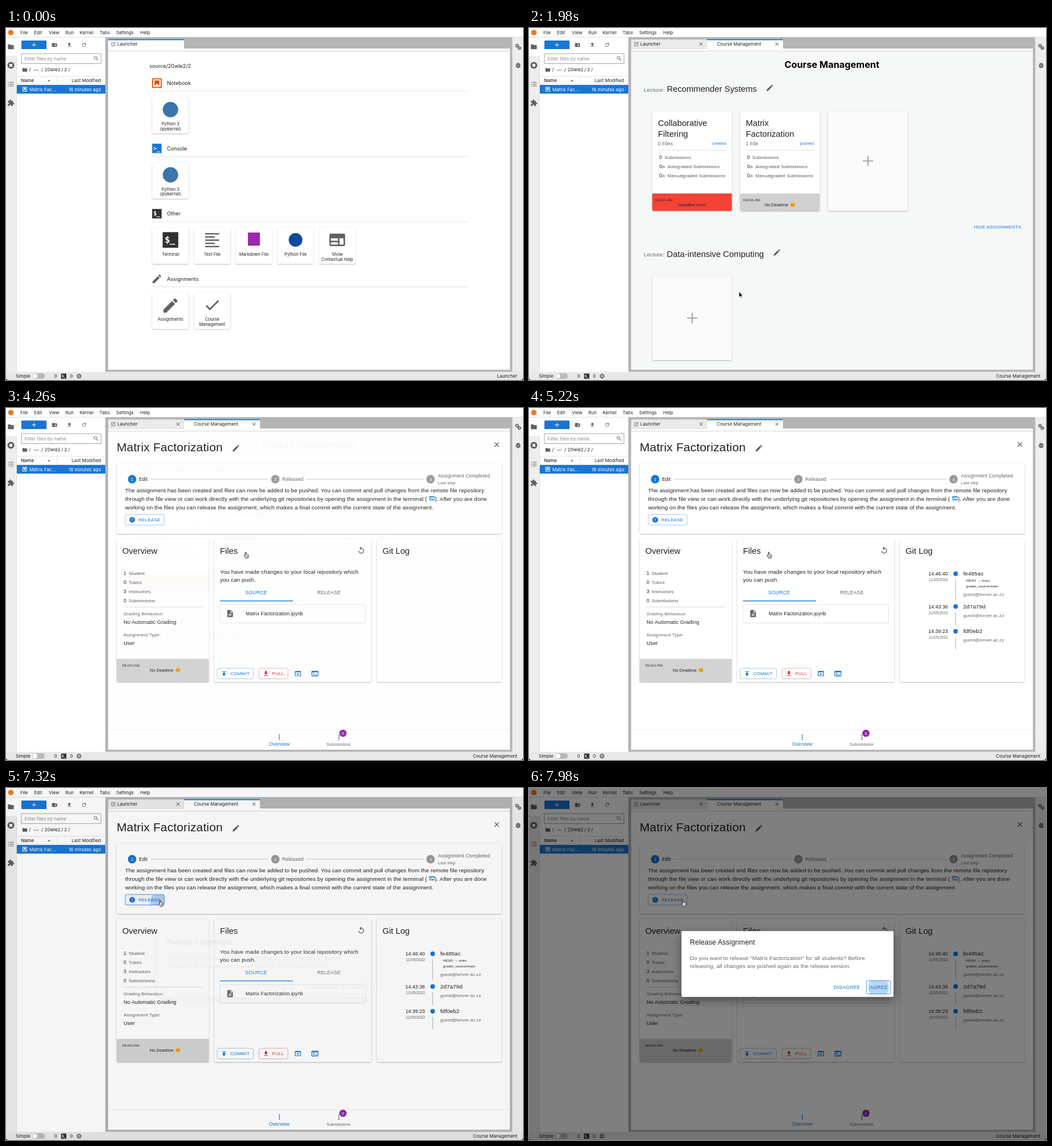
Write an HTML page that moves like this. It is 906 by 618 pixels and loops after 8000 ms.

```html
<!DOCTYPE html>
<html lang="en">
<head>
<meta charset="utf-8">
<title>Course Management</title>
<style>
html,body{margin:0;width:100%;height:100%;overflow:hidden;background:#fff}
svg{display:block;width:906px;height:618px}
.s{font-family:Inter,"Noto Sans",sans-serif}
.h{font-family:"Liberation Sans",Arial,sans-serif}
.m{font-family:"DejaVu Sans Mono",monospace;font-weight:bold}
</style>
</head>
<body>
<svg id="stage" viewBox="0 0 906 618" xmlns="http://www.w3.org/2000/svg"></svg>
<script>
const LOOP = 8000;
const BLUE = '#1976d2', DARK = '#1f1f1f', GREY = '#666', ICON = '#616161', EDGE = '#b5b5b5';

const ICONS = {
  pencil: 'M3 17.25V21h3.75L17.81 9.94l-3.75-3.75L3 17.25zM20.71 7.04c.39-.39.39-1.02 0-1.41l-2.34-2.34c-.39-.39-1.02-.39-1.41 0l-1.83 1.83 3.75 3.75 1.83-1.83z',
  close: 'M19 6.41 17.59 5 12 10.59 6.41 5 5 6.41 10.59 12 5 17.59 6.41 19 12 13.41 17.59 19 19 17.59 13.41 12z',
  folder: 'M10 4H4c-1.1 0-2 .9-2 2v12c0 1.1.9 2 2 2h16c1.1 0 2-.9 2-2V8c0-1.1-.9-2-2-2h-8l-2-2z',
  addFolder: 'M20 6h-8l-2-2H4c-1.1 0-2 .9-2 2v12c0 1.1.9 2 2 2h16c1.1 0 2-.9 2-2V8c0-1.1-.9-2-2-2zm-1 8h-3v3h-2v-3h-3v-2h3V9h2v3h3v2z',
  upload: 'M9 16h6v-6h4l-7-7-7 7h4zm-4 2h14v2H5z',
  refresh: 'M17.65 6.35C16.2 4.9 14.21 4 12 4c-4.42 0-8 3.58-8 8s3.58 8 8 8c3.73 0 6.84-2.55 7.73-6h-2.08c-.82 2.33-3.04 4-5.65 4-3.31 0-6-2.69-6-6s2.69-6 6-6c1.66 0 3.14.69 4.22 1.78L13 11h7V4z',
  search: 'M15.5 14h-.79l-.28-.27C15.41 12.59 16 11.11 16 9.5 16 5.91 13.09 3 9.5 3S3 5.91 3 9.5 5.91 16 9.5 16c1.61 0 3.09-.59 4.23-1.57l.27.28v.79l5 4.99L20.49 19zm-6 0C7.01 14 5 11.99 5 9.5S7.01 5 9.5 5 14 7.01 14 9.5 11.99 14 9.5 14z',
  puzzle: 'M20.5 11H19V7c0-1.1-.9-2-2-2h-4V3.5C13 2.12 11.88 1 10.5 1S8 2.12 8 3.5V5H4c-1.1 0-2 .9-2 2v3.8h1.5c1.49 0 2.7 1.21 2.7 2.7s-1.21 2.7-2.7 2.7H2V20c0 1.1.9 2 2 2h3.8v-1.5c0-1.49 1.21-2.7 2.7-2.7s2.7 1.21 2.7 2.7V22H17c1.1 0 2-.9 2-2v-4h1.5c1.38 0 2.5-1.12 2.5-2.5S21.88 11 20.5 11z',
  bug: 'M20 8h-2.81c-.45-.78-1.07-1.45-1.82-1.96L17 4.41 15.59 3l-2.17 2.17a6 6 0 0 0-2.83 0L8.41 3 7 4.41l1.62 1.63C7.88 6.55 7.26 7.22 6.81 8H4v2h2.09L6 11v1H4v2h2v1l.09 1H4v2h2.81a6 6 0 0 0 10.38 0H20v-2h-2.09l.09-1v-1h2v-2h-2v-1l-.09-1H20zm-6 8h-4v-2h4zm0-4h-4v-2h4z',
  check: 'M9 16.17 4.83 12l-1.42 1.41L9 19 21 7l-1.41-1.41z',
  list: 'M3 5h2.5v2.5H3zM8 5h13v2H8zM3 11h2.5v2.5H3zM8 11h13v2H8zM3 17h2.5v2.5H3zM8 17h13v2H8z',
  popOut: 'M19 19H5V5h7V3H5a2 2 0 0 0-2 2v14c0 1.1.9 2 2 2h14c1.1 0 2-.9 2-2v-7h-2zM14 3v2h3.59l-9.83 9.83 1.41 1.41L19 6.41V10h2V3z',
  push: 'M5 4v2h14V4zm0 10h4v6h6v-6h4l-7-7z',
  pull: 'M19 9h-4V3H9v6H5l7 7zM5 18v2h14v-2z',
  browser: 'M19 4H5a2 2 0 0 0-2 2v12c0 1.1.89 2 2 2h4v-2H5V8h14v10h-4v2h4c1.1 0 2-.9 2-2V6a2 2 0 0 0-2-2zm-7 6-4 4h3v6h2v-6h3z',
  shell: 'M20 4H4a2 2 0 0 0-2 2v12c0 1.1.89 2 2 2h16c1.1 0 2-.9 2-2V6a2 2 0 0 0-2-2zm0 14H4V8h16zm-2-1h-6v-2h6zM7.5 17l-1.41-1.41L8.67 13l-2.59-2.59L7.5 9l4 4z',
  file: 'M14 2H6a2 2 0 0 0-2 2v16c0 1.1.89 2 2 2h12c1.1 0 2-.9 2-2V8zM16 18H8v-2h8zm0-4H8v-2h8zm-3-5V3.5L18.5 9z',
  badge: 'M23 12l-2.44-2.78.34-3.68-3.61-.82-1.89-3.18L12 3 8.6 1.54 6.71 4.72l-3.61.81.34 3.68L1 12l2.44 2.78-.34 3.69 3.61.82 1.89 3.18L12 21l3.4 1.46 1.89-3.18 3.61-.82-.34-3.68zm-10 5h-2v-2h2zm0-4h-2V7h2z',
  replay: 'M12 5V1L7 6l5 5V7c3.31 0 6 2.69 6 6s-2.69 6-6 6-6-2.69-6-6H4c0 4.42 3.58 8 8 8s8-3.58 8-8-3.58-8-8-8z',
  dots: 'M12 8a2 2 0 1 0 0-4 2 2 0 0 0 0 4zm0 2a2 2 0 1 0 0 4 2 2 0 0 0 0-4zm0 6a2 2 0 1 0 0 4 2 2 0 0 0 0-4z',
  panel: 'M20 4H4a2 2 0 0 0-2 2v12c0 1.1.9 2 2 2h16c1.1 0 2-.9 2-2V6a2 2 0 0 0-2-2zM4 10h9v3H4zm0 5h9v3H4zm11-5h5v8h-5z'
};

// drawing helpers: each returns markup
const rect = (x, y, x2, y2, fill, more = '') =>
  `<rect x="${x}" y="${y}" width="${x2 - x}" height="${y2 - y}" fill="${fill}" ${more}/>`;
const disc = (x, y, r, fill, more = '') => `<circle cx="${x}" cy="${y}" r="${r}" fill="${fill}" ${more}/>`;
const path = (d, stroke, w = 1, fill = 'none') =>
  `<path d="${d}" fill="${fill}" stroke="${stroke}" stroke-width="${w}"/>`;
const icon = (name, x, y, size, fill = ICON) =>
  `<path transform="translate(${x - size / 2} ${y - size / 2}) scale(${size / 24})" d="${ICONS[name]}" fill="${fill}" fill-rule="evenodd"/>`;
const text = (cls, x, y, str, size, fill, anchor, ls, more = '') =>
  `<text class="${cls}" x="${x}" y="${y}" font-size="${size}" fill="${fill}" text-anchor="${anchor}" letter-spacing="${ls}em" ${more}>${str}</text>`;
const ui = (x, y, str, size = 8, fill = DARK, anchor = 'start') => text('s', x, y, str, size, fill, anchor, 0);
const mat = (x, y, str, size = 8.63, fill = DARK, ls = .0107, anchor = 'start') => text('h', x, y, str, size, fill, anchor, ls);
const button = (x, y, str, size = 8.01, fill = BLUE, anchor = 'start') => mat(x, y, str, size, fill, .0286, anchor);
const group = (id, body) => `<g id="${id}">${body}</g>`;
const paper = (x, y, x2, y2, fill = '#fff') => rect(x, y, x2, y2, fill, 'rx="2.5" filter="url(#lift)"');
const outline = (x, y, x2, y2, color) => rect(x, y, x2, y2, 'none', `rx="2.5" stroke="${color}" stroke-width=".8"`);
const smile = (x, y) => disc(x, y, 4.6, '#f8bd3d') + disc(x - 1.6, y - 1, .7, '#6b4213') + disc(x + 1.6, y - 1, .7, '#6b4213') +
  disc(x - 2.8, y + .8, .9, '#f08a4b') + disc(x + 2.8, y + .8, .9, '#f08a4b') + path(`M${x - 2} ${y + 1.2}q2 2 4 0`, '#6b4213', .7);
const gear = (x, y, r) => disc(x, y, r, 'none', `stroke="${ICON}" stroke-width="1.5"`) +
  disc(x, y, r + 1, 'none', `stroke="${ICON}" stroke-width="1" stroke-dasharray="${(r + 1) * Math.PI / 8}"`);
const prompt = (x, y, size, str, half, fill) =>
  rect(x - half, y - half, x + half, y + half, fill) + text('m', x - half * .75, y + size * .32, str, size, '#fff', 'start', -.05);

function shell() {
  let s = rect(0, 0, 906, 618, '#fff') + rect(0, 16, 19, 604, '#ededed') + rect(887, 16, 906, 604, '#ededed') +
    rect(0, 17, 19, 49, '#fff') + rect(174, 16, 887, 604, EDGE) + rect(0, 603.5, 906, 618, '#e8e8e8') +
    path('M0 16.2H906M18.8 49V604M887.3 16V604', '#c9c9c9', .6) + disc(8.5, 8, 4.8, '#f37726');
  const menu = { File: 25, Edit: 49, View: 75, Run: 104, Kernel: 129, Tabs: 164, Settings: 193, Help: 235 };
  for (const k in menu) s += ui(menu[k], 11, k);
  s += icon('folder', 8.5, 33, 12.5) + icon('list', 8.5, 98.5, 13) + icon('puzzle', 8.5, 131.5, 13) +
    disc(8.5, 65.5, 6, ICON) + rect(6.1, 63.1, 10.9, 67.9, '#fff', 'rx=".6"') +
    gear(895.5, 31, 2) + gear(899.6, 35.2, 1.9) + icon('bug', 897.5, 65.5, 12.5);
  // file browser
  s += rect(19, 17, 174, 603.5, '#fff') + rect(27, 22, 71, 37, BLUE, 'rx="1"') + path('M45.5 29.6h7M49 26.1v7', '#fff', 1) +
    icon('addFolder', 85, 29.7, 10.5) + icon('upload', 111, 29.5, 10.5) + icon('refresh', 137, 29.7, 10) +
    rect(27, 45, 166.5, 62.5, '#fff', 'stroke="#9a9a9a" stroke-width=".9"') + ui(32.5, 57, 'Filter files by name', 8.2, '#8a8a8a') +
    icon('search', 158, 53.5, 11) + icon('folder', 33, 73.5, 10) + ui(40.5, 76.4, '/') +
    disc(50, 74, .8, DARK) + disc(53, 74, .8, DARK) + disc(56, 74, .8, DARK) +
    ui(62, 76.4, '/') + ui(67.5, 76.4, '20wle2') + ui(97, 76.4, '/') + ui(102, 76.4, '2') + ui(109, 76.4, '/') +
    path('M19 84.8H174M19 99.8H174M89.5 85V100', '#dcdcdc', .8) +
    text('s', 26.5, 95.3, 'Name', 8, DARK, 'start', 0, 'font-weight="500"') + path('M72.8 93.6l2.6-2.6 2.6 2.6z', 'none', 0, ICON) +
    ui(166.5, 95.3, 'Last Modified', 8, DARK, 'end') + rect(19, 100, 174, 115.2, BLUE) +
    rect(29.3, 104, 36.2, 111, 'none', 'stroke="#fff" stroke-width="1"') + path('M31 105.2h3.5v4.4l-1.75-1.5-1.75 1.5z', 'none', 0, '#fff') +
    ui(41, 110.8, 'Matrix Fac...', 8, '#fff') + ui(166.5, 110.8, '16 minutes ago', 8, '#fff', 'end');
  // status bar
  s += ui(17, 614, 'Simple') + rect(46, 606.3, 68, 615.8, '#b9b9b9', 'rx="4.7"') + disc(50.8, 611, 4, '#fff') +
    ui(84.5, 614, '0') + prompt(101.2, 611.3, 6, '$_', 4.6, '#333') + ui(112, 614, '0') +
    gear(128, 611.2, 2.9) + disc(128, 611.2, 1, ICON);
  return s + rect(179, 36, 883, 600, '#fff') + path('M179 40.6H883', '#c4c4c4', .8);
}

function launchCard(x, y, art, label, id = '') {
  const lines = label.split('|'), cx = x + 31.7;
  return paper(x, y, x + 63.4, y + 63.4) + (id ? `<rect id="${id}" x="${x}" y="${y}" width="63.4" height="63.4" fill="#fff" filter="url(#high)"/>` : '') +
    art(cx, y + 21.5) + lines.map((l, i) => ui(cx, y + 49.4 + i * 8.6, l, 7.4, DARK, 'middle')).join('');
}

function launcher() {
  const py = (x, y) => disc(x, y, 13.5, '#3b75ab');
  const pyFile = (x, y) => disc(x, y, 12, '#0a4a9f');
  const lines = (x, y) => [0, 1, 2, 3, 4].map(i => rect(x - 12.3, y - 12 + i * 5.6, x + (i % 2 ? 4.5 : 12.3), y - 9.6 + i * 5.6, ICON)).join('');
  let s = ui(251.5, 70, 'source/20wle2/2', 9);
  ['Notebook', 'Console', 'Other', 'Assignments'].forEach((n, i) => {
    const y = 97 + i * 114.5;
    s += ui(282, y + 3.2, n, 9.15) + path(`M255 ${y + 14}H810.5`, '#dcdcdc', .8);
  });
  s += rect(257, 89.3, 272, 104.3, '#fff', 'stroke="#e65100" stroke-width="1.8"') + path('M260.3 92h8.4v9.6l-4.2-3.6-4.2 3.6z', 'none', 0, '#e65100') +
    prompt(264.4, 211.4, 10, '&gt;_', 8.2, BLUE) + prompt(264.4, 326, 10, '$_', 8.3, '#333') + icon('pencil', 264.4, 440.5, 20);
  s += launchCard(256.5, 121.7, py, 'Python 3|(ipykernel)') + launchCard(256.5, 236.2, py, 'Python 3|(ipykernel)') +
    launchCard(256.5, 350.6, (x, y) => prompt(x, y, 16, '$_', 13.7, '#333'), 'Terminal') +
    launchCard(329.6, 350.6, lines, 'Text File') +
    launchCard(402.7, 350.6, (x, y) => rect(x - 10.5, y - 13, x + 10.5, y + 10, '#9c27b0'), 'Markdown File') +
    launchCard(475.7, 350.6, pyFile, 'Python File') +
    launchCard(548.8, 350.6, (x, y) => icon('panel', x, y, 33), 'Show|Contextual Help') +
    launchCard(256.5, 464.8, (x, y) => icon('pencil', x, y + 1, 33), 'Assignments') +
    launchCard(329.6, 464.8, (x, y) => icon('check', x, y, 32), 'Course|Management', 'lift-card');
  return s + rect(179, 20, 312, 40, '#fff') + rect(179, 19.6, 312, 21.4, BLUE) +
    icon('popOut', 188, 28.3, 9) + ui(195, 31.3, 'Launcher') + ui(896, 614, 'Launcher', 8, DARK, 'end');
}

const tabs = () => rect(179, 20, 312, 36, '#ebebeb', 'stroke="#c4c4c4" stroke-width=".6"') + icon('popOut', 188, 28.3, 9) + ui(195, 31.3, 'Launcher') +
  icon('close', 301.5, 28.3, 10.5) + rect(312, 20, 445, 40, '#fff') + rect(312, 19.6, 445, 21.4, BLUE) +
  ui(329.3, 31.3, 'Course Management', 7.87) + icon('close', 434.5, 28.3, 10.5) +
  ui(896, 614, 'Course Management', 7.87, DARK, 'end') + rect(179, 41, 883, 600, '#f6f8f8') +
  text('s', 530.8, 69.8, 'Course Management', 16.3, '#000', 'middle', 0, 'font-weight="700"');

function taskCard(x, title, files, state, id) {
  let s = paper(x, 146.5, x + 139.5, 321) + (id ? `<rect id="${id}" x="${x}" y="146.5" width="139.5" height="174.5" rx="2.5" fill="#eeeeee"/>` : '');
  title.forEach((l, i) => s += mat(x + 10, 171.7 + i * 19.7, l, 14.79, DARK, 0));
  s += mat(x + 10, 205.6, files, 8.63, GREY) + mat(x + 129.5, 204.6, state, 7.4, BLUE, .012, 'end') + path(`M${x + 10} 214.3h120`, '#d6d6d6', .8);
  ['Submissions', 'Autograded Submissions', 'Manualgraded Submissions'].forEach((l, i) => {
    const y = 229.9 + i * 16.2;
    s += mat(x + 12.3, y, '0', 8.63) + (i ? mat(x + 17.2, y, '/0', 5.6) : '') + mat(x + (i ? 26.7 : 21.2), y, l, 8.05, '#555');
  });
  return s;
}
const strip = (x, x2, y, y2, fill) => `<path d="M${x} ${y}H${x2}V${y2 - 2.5}q0 2.5-2.5 2.5H${x + 2.5}q-2.5 0-2.5-2.5z" fill="${fill}"/>`;
const due = (x, y) => mat(x, y, 'DEADLINE', 5.5, DARK, .083);
const plus = (x, y) => path(`M${x - 9} ${y}h18M${x} ${y - 9}v18`, '#a3a3a3', 2);

const lectures = () => mat(201, 111.6, 'Lecture:', 9.86, GREY) + mat(241.5, 112.2, 'Recommender Systems', 14.79, DARK, 0) + icon('pencil', 422, 105, 14.8) +
  mat(201, 401, 'Lecture:', 9.86, GREY) + mat(241.5, 401.6, 'Data-intensive Computing', 14.79, DARK, 0) + icon('pencil', 434.5, 394, 14.8);

const cards = () => taskCard(216, ['Collaborative', 'Filtering'], '0 Files', 'created') + strip(216, 355.5, 290.6, 321, '#f44336') + due(221, 304) +
  mat(285.8, 313, 'Deadline over!', 7.4, DARK, .012, 'middle') +
  taskCard(370, ['Matrix', 'Factorization'], '1 File', 'pushed', 'hover-card') + strip(370, 509.5, 290.6, 321, '#d0d0d0') + due(375, 304) +
  mat(413, 313, 'No Deadline', 7.4, DARK, .012) + smile(461.8, 310) +
  paper(524, 146.5, 664, 321, '#fafafa') + plus(594, 233.5) + button(862.5, 352.4, 'HIDE ASSIGNMENTS', 8.01, BLUE, 'end') +
  paper(216, 435.5, 355.5, 583, '#fafafa') + plus(286, 509.2);

function detail() {
  let s = rect(179, 41, 883, 600, '#fff') + mat(194, 75.6, 'Matrix Factorization', 20.95, DARK, .00735) + icon('pencil', 403, 70.5, 15) +
    icon('close', 860, 64, 15) + paper(194, 97.5, 868.5, 221) +
    path('M254 125H460M526 125H732', '#bdbdbd', .8);
  [[221, BLUE], [472, '#9a9a9a'], [744, '#9a9a9a']].forEach(([x, c], i) =>
    s += disc(x, 125, 7.4, c) + mat(x, 127.7, i + 1, 7.4, '#fff', 0, 'middle'));
  s += mat(233, 128.2, 'Edit') + mat(484, 128.2, 'Released', 8.63, GREY) + mat(757, 121.8, 'Assignment Completed', 8.63, GREY) + mat(757, 133.6, 'Last step', 7.4, GREY, .012);
  s += mat(208.7, 148.4, 'The assignment has been created and files can now be added to be pushed. You can commit and pull changes from the remote file repository', 9.86, DARK, .0094) +
    mat(208.7, 163.1, 'through the file view or can work directly with the underlying git repositories by opening the assignment in the terminal (', 9.86, DARK, .0094) +
    icon('shell', 746.3, 158.6, 11, BLUE) + mat(751.5, 163.1, '). After you are done', 9.86, DARK, .0094) +
    mat(208.7, 177.7, 'working on the files you can release the assignment, which makes a final commit with the current state of the assignment.', 9.86, DARK, .0094);
  s += '<rect id="rel" x="209" y="187" width="68.3" height="18.5" rx="2.5" stroke-width=".8"/>' +
    '<g clip-path="url(#relClip)"><circle id="wave" cx="270" cy="199" fill="#1976d2"/></g>' +
    icon('badge', 221.2, 196.3, 12, BLUE) + button(232, 199.2, 'RELEASE');
  // overview
  s += paper(194, 230, 355.5, 481) + mat(203.7, 255.5, 'Overview', 14.79, DARK, 0);
  ['Student', 'Tutors', 'Instructors', 'Submissions'].forEach((l, i) =>
    s += mat(206, 292.8 + i * 16.1, [1, 0, 3, 0][i], 8.63) + mat(215, 292.6 + i * 16.1, l, 8.01, '#555'));
  s += path('M204 349.5H345.5', '#d6d6d6', .8) + mat(206, 363.8, 'Grading Behaviour:', 8.01, GREY) + mat(206, 378.5, 'No Automatic Grading', 9.25) +
    mat(206, 400.8, 'Assignment Type:', 8.01, GREY) + mat(206, 415.8, 'User', 9.25) +
    strip(194, 355.5, 440.5, 481, '#d3d3d3') + due(203.7, 453.8) + mat(252, 463, 'No Deadline', 7.4, DARK, .012) + smile(301.2, 460);
  // files
  s += paper(365, 230, 640, 481) + mat(375, 255.5, 'Files', 14.79, DARK, 0) + icon('replay', 622.5, 250, 14.8) +
    mat(375, 290.6, 'You have made changes to your local repository which', 9.86, DARK, .0094) + mat(375, 305.4, 'you can push.', 9.86, DARK, .0094) +
    button(438.5, 327.3, 'SOURCE', 8.63, BLUE, 'middle') + button(566, 327.3, 'RELEASE', 8.63, GREY, 'middle') + rect(375, 338, 503, 339.4, BLUE) +
    outline(375, 345, 630, 377.5, '#dcdcdc') + icon('file', 392.7, 361, 14.8) + mat(420, 364.2, 'Matrix Factorization.ipynb', 8.63) +
    outline(370, 457, 433.5, 475.5, '#8cbae8') + icon('push', 382, 466.2, 12, BLUE) + button(393, 469.2, 'COMMIT') +
    outline(443.5, 457, 494, 475.5, '#e99797') + icon('pull', 455.5, 466.2, 12, '#d32f2f') + button(466.5, 469.2, 'PULL', 8.01, '#d32f2f') +
    icon('browser', 511.5, 466.3, 14, BLUE) + icon('shell', 541.3, 466.3, 14.5, BLUE);
  s += paper(650, 230, 868.5, 481) + mat(659.7, 255.5, 'Git Log', 14.79, DARK, 0) + group('log', gitLog());
  s += rect(179, 564.5, 883, 600, '#fff') + path('M179 564.7H883', '#ececec', .8) + icon('dots', 479, 577.8, 14, BLUE) +
    mat(478.8, 593, 'Overview', 8.63, BLUE, 0, 'middle') + icon('dots', 583.3, 578.2, 14) + mat(582.8, 593, 'Submissions', 7.4, GREY, .002, 'middle') +
    disc(590.5, 571, 6.3, '#8e24aa') + mat(590.5, 573.6, '0', 7.2, '#fff', 0, 'middle');
  return s;
}

function gitLog() {
  const rows = [[291, '14:46:40', 'fe485ac', 301, 337, 35.5], [348.6, '14:43:36', '2d7a79d', 359, 381, 15], [392, '14:39:23', 'fdf0eb2', 402, 424, 15]];
  return rows.map(([y, time, hash, a, b, d]) => mat(734.2, y + 3.1, time, 8.63, DARK, .0107, 'end') + mat(734.2, y + 13.4, '11/05/2022', 6.78, GREY, 0, 'end') +
    disc(747.6, y, 4, BLUE) + path(`M747.6 ${a}V${b}`, '#bdbdbd', 1.2) + mat(761, y + 3.2, hash, 9.86, DARK, .0094) +
    mat(761, y + d + 3.2, 'guest@lonver.ac.zz', 8.01, GREY)).join('') +
    mat(766, 305.3, 'HEAD → main,', 6.2) + mat(766, 314.5, 'grader_source/main', 6.2);
}

const dialog = () => rect(267.3, 251.3, 638.7, 366.7, '#fff', 'rx="2.5" filter="url(#float)"') + mat(282, 275, 'Release Assignment', 12.33, DARK, .0075) +
  mat(282, 301.6, 'Do you want to release "Matrix Factorization" for all students? Before', 9.86, GREY, .0094) +
  mat(282, 316.4, 'releasing, all changes are pushed again as the release version.', 9.86, GREY, .0094) +
  button(534, 353, 'DISAGREE', 8.63) + '<g clip-path="url(#okClip)"><circle id="pulse" cx="612.5" cy="350" fill="#1976d2" opacity=".3"/></g>' +
  outline(591.3, 338.3, 633.7, 361.7, BLUE) + button(612.7, 353, 'AGREE', 8.63, BLUE, 'middle');

const shadow = (id, dy, blur, a) => `<filter id="${id}" x="-20%" y="-20%" width="140%" height="150%"><feDropShadow dx="0" dy="${dy}" stdDeviation="${blur}" flood-opacity="${a}"/></filter>`;
const stage = document.getElementById('stage');
stage.innerHTML = `<defs>${shadow('lift', .8, 1, .32)}${shadow('high', 2, 2.6, .35)}${shadow('float', 6, 9, .4)}
<clipPath id="relClip">${rect(209, 187, 277.3, 205.5, '#000', 'rx="2.5"')}</clipPath><clipPath id="okClip">${rect(591.3, 338.3, 633.7, 361.7, '#000', 'rx="2.5"')}</clipPath></defs>` +
  shell() + group('launcher', launcher()) + group('course', tabs() + group('lectures', lectures()) + group('cards', cards())) +
  group('detail', detail()) + rect(0, 0, 906, 618, '#000', 'id="shade"') + group('dialog', dialog()) +
  path('M0 613.5V618H4.5Q0 618 0 613.5M906 613.5V618h-4.5q4.5 0 4.5-4.5', 'none', 0, '#111') +
  group('arrow', '<path d="M0 0V9.6L2.2 7.6 3.7 11 5.2 10.3 3.7 7.1H6.8Z" fill="#000" stroke="#fff" stroke-width=".7"/>') +
  group('hand', '<path d="M-.2 10.8V9.9L-2.6 7Q-3.2 5.9-2.4 5.6T-.8 6.4V1Q-.7 0 0 0T.8 1V4Q2.2 3.6 2.3 4.5 3.6 4.1 3.7 5 5 4.8 5 5.9V7.6Q5 9 4.2 10V10.8Z" fill="#fff" stroke="#000" stroke-width=".8"/><path d="M.9 6.6v2.4M2.3 6.6v2.4M3.6 6.6v2.4" stroke="#000" stroke-width=".5"/>');

const el = {};
stage.querySelectorAll('[id]').forEach(e => el[e.id] = e);

const clamp = v => Math.max(0, Math.min(1, v));
// cubic-bezier(.4, 0, .2, 1)
function ease(x) {
  x = clamp(x);
  let a = 0, b = 1, u = x;
  for (let i = 0; i < 20; i++) {
    u = (a + b) / 2;
    if (1.2 * u * (1 - u) ** 2 + .6 * u * u * (1 - u) + u ** 3 < x) a = u; else b = u;
  }
  return u * u * (3 - 2 * u);
}
const ramp = (t, start, len) => ease((t - start) / len);
const smooth = u => u * u * (3 - 2 * u);

const trail = [[120, 331, 603], [660, 356.5, 509], [1740, 356.5, 509], [2580, 414, 278], [2900, 416.3, 269], [3040, 416.3, 269],
  [3300, 420, 252.8], [6000, 420, 252.8], [6760, 270.3, 197]];
function pointer(t) {
  let i = 0;
  while (i < trail.length - 2 && t > trail[i + 1][0]) i++;
  const [a, x, y] = trail[i], [b, x2, y2] = trail[i + 1], k = smooth(clamp((t - a) / (b - a)));
  return [x + (x2 - x) * k, y + (y2 - y) * k];
}

const show = (id, on) => el[id].setAttribute('visibility', on ? 'inherit' : 'hidden');
const fade = (id, v) => el[id].setAttribute('opacity', v);

function draw(t) {
  show('launcher', t < 900);
  show('course', t >= 900);
  show('lectures', t >= 1500);
  show('cards', t >= 1560);
  fade('lift-card', ramp(t, 560, 100));
  fade('hover-card', ramp(t, 2400, 200));
  show('detail', t >= 4080);
  fade('detail', ramp(t, 4080, 225));
  show('log', t >= 4380);

  const over = ramp(t, 6700, 200) * (1 - ramp(t, 7300, 200));
  el.rel.setAttribute('fill', `rgba(25,118,210,${.06 * over})`);
  el.rel.setAttribute('stroke', `rgba(25,118,210,${.5 + .5 * over})`);
  el.wave.setAttribute('r', 68 * ramp(t, 7180, 550));
  fade('wave', .3 * (1 - ramp(t, 7350, 550)));

  const open = ramp(t, 7285, 225);
  fade('shade', .5 * open);
  fade('dialog', open);
  show('dialog', t >= 7285);
  const beat = clamp((t - 7485) / 1250);
  el.pulse.setAttribute('r', 18.9 * ramp(t, 7285, 200) * (1 - .08 * smooth(beat)));

  const [x, y] = pointer(t);
  const hand = (t >= 600 && t < 900) || (t >= 2400 && t < 6000) || t >= 6660;
  for (const id of ['arrow', 'hand']) {
    el[id].setAttribute('transform', `translate(${x} ${y})`);
    show(id, t >= 120 && hand === (id === 'hand'));
  }
}

const begin = performance.now();
function tick() {
  draw((performance.now() - begin) % LOOP);
  requestAnimationFrame(tick);
}
draw(0);
requestAnimationFrame(tick);
</script>
</body>
</html>
```
